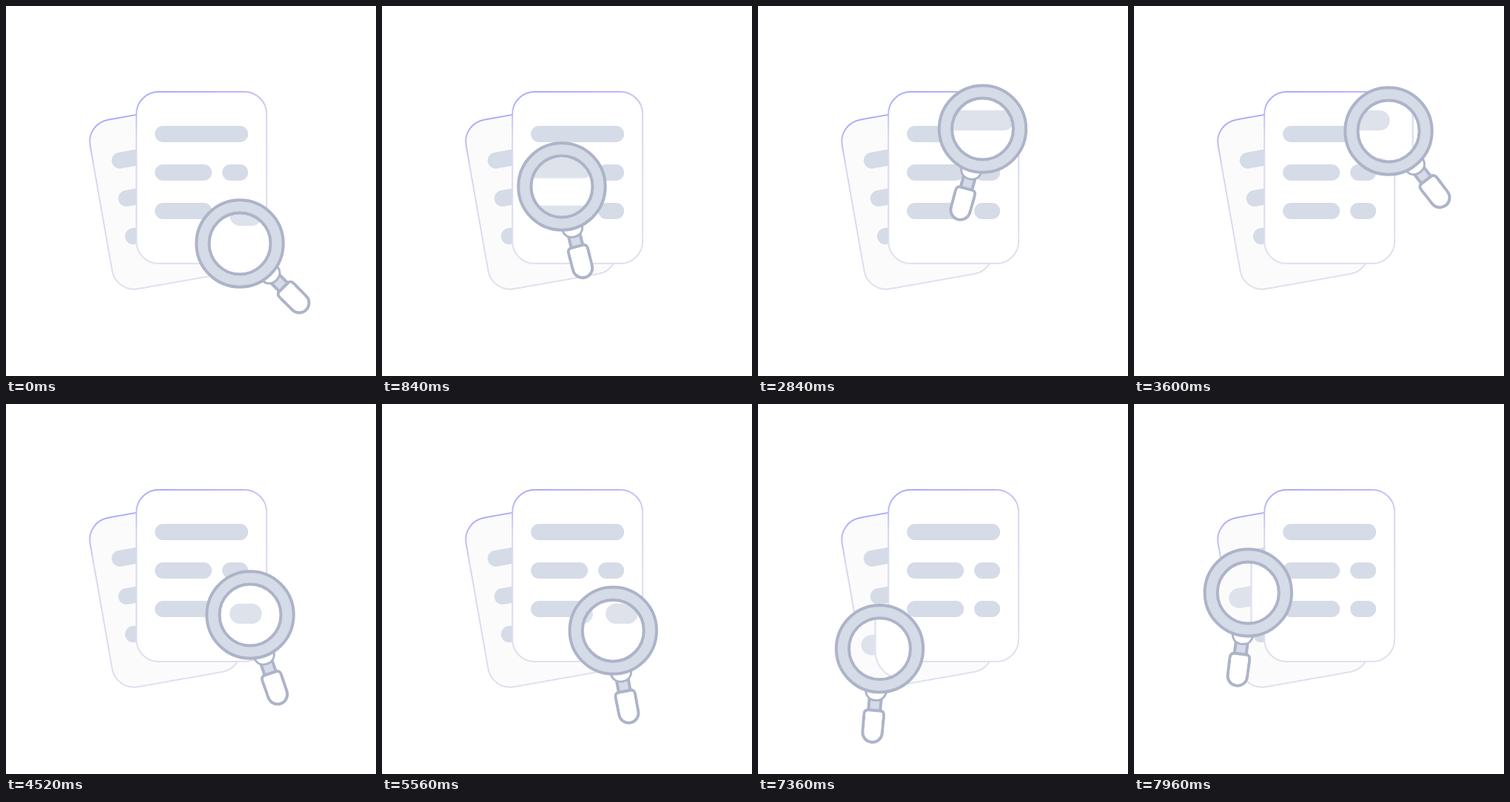
An HTML page that plays this animation: 500x500 px, repeating every 8000 ms.

```html
<!DOCTYPE html>
<html lang="en">
<head>
<meta charset="utf-8">
<title>Searching documents</title>
<style>
  html, body { margin: 0; width: 100%; height: 100%; overflow: hidden; background: #fff; }
  svg { display: block; width: 100vw; height: 100vh; }
</style>
</head>
<body>
<svg viewBox="0 0 500 500">
  <defs>
    <linearGradient id="edge" x1="0" y1="0" x2=".12" y2="1">
      <stop offset="0" stop-color="#a9a7fb"/>
      <stop offset=".25" stop-color="#d6d6f2"/>
      <stop offset="1" stop-color="#e0e0ef"/>
    </linearGradient>
    <clipPath id="glass"><circle id="hole" r="41"/></clipPath>
    <g id="page">
      <rect width="176" height="232" rx="30" stroke="url(#edge)" stroke-width="2"/>
      <path d="M36 57H140M36 109H91M127 109H140M36 161H91M127 161H140"
        stroke="#d5dbe7" stroke-width="22" stroke-linecap="round"/>
    </g>
    <g id="pages">
      <use href="#page" fill="#fbfbfc" transform="rotate(-10) translate(79.2 175.3)"/>
      <use href="#page" fill="#fff" transform="translate(176.2 116)"/>
    </g>
  </defs>

  <use href="#pages"/>

  <g id="handle" fill="#fff" stroke="#adb4c8" stroke-width="4" stroke-linejoin="round">
    <path d="M-8 66V84H8V66Z" fill="#d5dbe7"/>
    <path d="M-14 57C-13 66 -7 70 0 70S13 66 14 57Z" stroke-width="3"/>
    <rect x="-13.2" y="83.5" width="26.4" height="20" rx="5"/>
    <path d="M-13.2 91V113.5A13.2 13.2 0 0 0 13.2 113.5V91"/>
    <path d="M-11.2 87H11.2V95H-11.2Z" stroke="none"/>
    <path d="M-11.2 90H11.2V112H-11.2Z" stroke="none"/>
  </g>
  <g id="lens">
    <circle r="58.7" fill="#d5dbe7" stroke="#adb4c8" stroke-width="4"/>
    <circle r="41.5" fill="#fff"/>
  </g>
  <g clip-path="url(#glass)" opacity=".8">
    <use href="#pages" transform="translate(-60 -60) scale(1.24)"/>
  </g>
  <circle id="rim" r="41.5" fill="none" stroke="#adb4c8" stroke-width="4"/>
</svg>
<script>
const LOOP = 8000;

// Wandering over the page: time, lens x, lens y, handle tilt
const path = [
  [0, 316, 321, 45],
  [840, 243, 244, 14.3],
  [1200, 265, 168, 7],
  [1690, 179, 184, -3],
  [2120, 205, 152, -16.5],
  [2520, 269, 145, -34],
  [3360, 340, 210, 32],
  [3600, 344, 169, 37.6],
  [4520, 330, 285, 19],
  [4840, 325, 304, 12]
];

// Later moves between rests, added to the end of the path
const glides = [
  { start: 5360, length: 1160, by: [-160.5, 27, -17] },
  { start: 7330, length: 1200, by: [-19, -141.5, -4.3] }
];

const ease = s => { s = Math.min(Math.max(s, 0), 1); return s * s * (3 - 2 * s); };
const rate = (i, c) => (path[i + 1][c] - path[i][c]) / (path[i + 1][0] - path[i][0]);

// Turning points and ends have no speed, others a harmonic mean
function speed(i, c) {
  if (i === 0 || i === path.length - 1) return 0;
  const a = rate(i - 1, c), b = rate(i, c);
  return a * b <= 0 ? 0 : 2 * a * b / (a + b);
}

function wander(t, c) {
  let i = 0;
  while (i < path.length - 2 && t >= path[i + 1][0]) i++;
  const p = path[i], q = path[i + 1], span = q[0] - p[0];
  const s = Math.min((t - p[0]) / span, 1), r = 1 - s;
  return p[c] + (q[c] - p[c]) * ease(s)
    + span * s * r * (speed(i, c) * r - speed(i + 1, c) * s);
}

const valueAt = (t, c) => glides.reduce(
  (sum, g) => sum + g.by[c - 1] * ease((t - g.start) / g.length), wander(t, c));

const [handle, lens, hole, rim] =
  ["handle", "lens", "hole", "rim"].map(id => document.getElementById(id));

function draw(now) {
  const t = now % LOOP;
  const move = `translate(${valueAt(t, 1)} ${valueAt(t, 2)})`;
  for (const el of [lens, hole, rim]) el.setAttribute("transform", move);
  handle.setAttribute("transform", `${move} rotate(${-valueAt(t, 3)})`);
}

let start;
function tick(now) {
  start ??= now;
  draw(now - start);
  requestAnimationFrame(tick);
}
draw(0);
requestAnimationFrame(tick);
</script>
</body>
</html>
```
